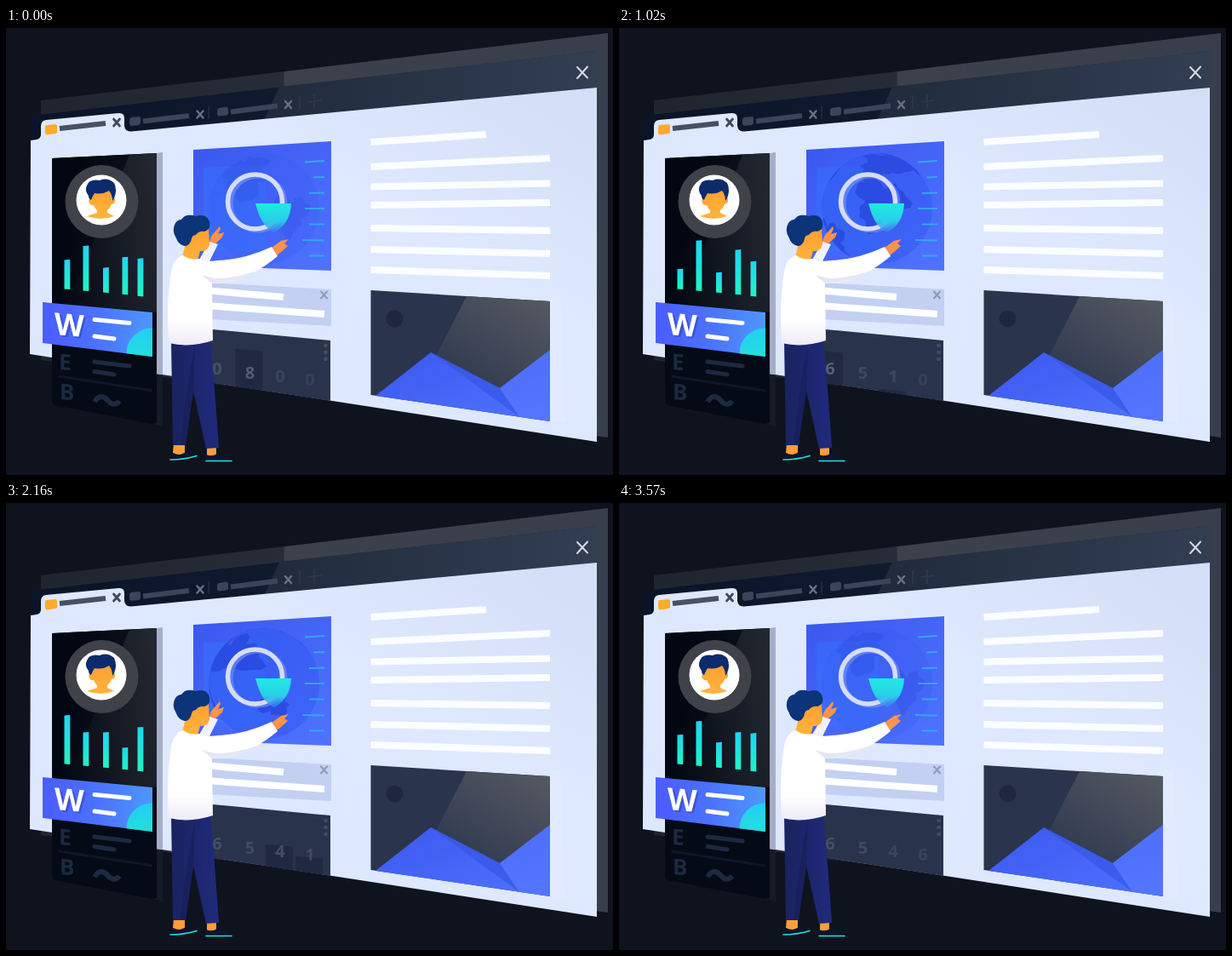
Write an HTML page that moves like this. It is 713 px wide and 525 px high and loops after 3600 ms.

```html
<!DOCTYPE html>
<html lang="en">
<head>
<meta charset="utf-8">
<title>Dashboard</title>
<style>
html, body { margin: 0; width: 100%; height: 100%; overflow: hidden; background: #0f131e; }
svg { display: block; width: 713px; height: 525px; }
text { font-family: "Open Sans", "Noto Sans", sans-serif; font-weight: 700; }
.line { fill: none; stroke-linecap: round; }
</style>
</head>
<body>
<svg viewBox="0 0 713 525">
  <defs>
    <linearGradient id="rear"><stop offset="0" stop-color="#20242e"/><stop offset=".428" stop-color="#282c38"/><stop offset=".43" stop-color="#3d414c"/><stop offset="1" stop-color="#393e4c"/></linearGradient>
    <linearGradient id="head"><stop offset="0" stop-color="#0b1328"/><stop offset="1" stop-color="#172137"/></linearGradient>
    <linearGradient id="headShine"><stop offset="0" stop-color="#202a3c"/><stop offset="1" stop-color="#333e53"/></linearGradient>
    <linearGradient id="page" x1="0" y1="1" x2="1" y2="0"><stop offset="0" stop-color="#dde8ff"/><stop offset=".65" stop-color="#dee8ff"/><stop offset="1" stop-color="#d3def6"/></linearGradient>
    <linearGradient id="side" x2="1" y2=".3"><stop offset=".3" stop-color="#020712"/><stop offset="1" stop-color="#10151f"/></linearGradient>
    <linearGradient id="sheen" x1="1" x2="0" y2="1"><stop offset="0" stop-color="#fff" stop-opacity=".09"/><stop offset="1" stop-color="#fff" stop-opacity="0"/></linearGradient>
    <linearGradient id="blue" x2="1" y2="1"><stop offset="0" stop-color="#3a57ee"/><stop offset="1" stop-color="#5073ff"/></linearGradient>
    <linearGradient id="word"><stop offset="0" stop-color="#4b5cff"/><stop offset=".5" stop-color="#4b72ff"/><stop offset="1" stop-color="#4e97fb"/></linearGradient>
    <linearGradient id="teal" x2="0" y2="1"><stop offset="0" stop-color="#20d4f4"/><stop offset="1" stop-color="#1ff5c4"/></linearGradient>
    <linearGradient id="cup" x2="0" y2="1"><stop offset="0" stop-color="#20eae2"/><stop offset=".6" stop-color="#28cfe8"/><stop offset="1" stop-color="#3b86f2" stop-opacity=".6"/></linearGradient>
    <linearGradient id="glare" x1="1" x2=".2" y2="1"><stop offset="0" stop-color="#575a62"/><stop offset="1" stop-color="#2e384f"/></linearGradient>
    <linearGradient id="skin" x2="0" y2="1"><stop offset="0" stop-color="#ff9f32"/><stop offset="1" stop-color="#ffb43c"/></linearGradient>
    <linearGradient id="shirt" x2="0" y2="1"><stop offset=".75" stop-color="#fff"/><stop offset="1" stop-color="#eeeaf8"/></linearGradient>
    <linearGradient id="leg"><stop offset="0" stop-color="#1a235f"/><stop offset="1" stop-color="#1f2a7c"/></linearGradient>
    <clipPath id="wordClip"><path d="M43 322 172 334V386L43 370Z"/></clipPath>
    <clipPath id="panelClip"><path d="M200 350 381 367V438L200 410Z"/></clipPath>
    <path id="cross" class="line" d="M-3.5-4 3.5 4M3.5-4-3.5 4"/>
  </defs>

  <path d="M41 85 707 6V481L41 390Z" fill="url(#rear)"/>
  <path d="M29 103 694 27V486L28 383Z" fill="url(#head)"/>
  <path d="M321 69 694 27V71L303 109Z" fill="url(#headShine)"/>
  <path d="M29 132 36 131Q41 130 41 125V115Q41 109 47 108L132 100Q139 99 139 106V115Q140 122 147 121.500L694 70V486L28 383Z" fill="url(#page)"/>

  <!-- tabs -->
  <path d="M48 114 58 113Q60 113 60 115V122Q60 124 58 124L48 125.500Q46 125 46 123V116Q46 114 48 114Z" fill="#ffab2b"/>
  <path d="M63 118 117 112" stroke="#485064" stroke-width="6"/>
  <use href="#cross" x="130" y="111" stroke="#3f475a" stroke-width="2.700"/>
  <g stroke="#3b4558" fill="#3b4558">
    <path d="M147 105 156 104Q158 104 158 106V112L156 114 147 115 145 113V107ZM250 94 259 92.500 261 94V101L259 102.500 250 103.500 248 102V96Z" stroke="none"/>
    <path d="M161 109.500 215 103M264 98.500 319 91.500" stroke-width="6"/>
    <path d="M238 92V107M345 79V95M354 87 371 85M362 78V95" stroke-width="1.500" opacity=".5"/>
  </g>
  <g stroke="#687184" stroke-width="2.500"><use href="#cross" x="228" y="101.500"/><use href="#cross" x="331.500" y="90"/></g>
  <path class="line" d="M671 46 683 58.500M683 45.500 671 59" stroke="#d6dbe3" stroke-width="2"/>

  <!-- profile column -->
  <path d="M177 147 184 146V407.500L177 406.500Z" fill="#a5aec8"/>
  <path d="M172 406 184 407.500V468L172 465Z" fill="#161b27"/>
  <path d="M54 153 177 147V464L172 465 57 443 54 440Z" fill="#040a16"/>
  <path d="M54 153 177 147V334L54 323Z" fill="url(#side)"/>
  <path d="M145 149 177 147V334L72 325Z" fill="url(#sheen)"/>
  <circle cx="112.500" cy="204" r="43" fill="#404249"/>
  <circle cx="112" cy="202" r="29.500" fill="#fff"/>
  <path d="M101 192 99 200Q96 201 98 206 100 209 103 208 105 213 107 214V217L95 221Q111 227 127 221L119 217V214Q123 211 124 207 129 206 128 201L122 188Z" fill="url(#skin)"/>
  <path d="M100 202Q97 201 97 197 92 191 95 185 98 177 110 179 119 175 127 182 131 190 127 200L125 203Q125 196 121 191 113 196 104 194 102 197 100 202Z" fill="#0b2b6d"/>
  <circle id="flash" cx="112.500" cy="204" r="43" fill="#fff"/>
  <g id="bars" fill="url(#teal)"></g>

  <path d="M43 322 172 334V386L43 370Z" fill="url(#word)"/>
  <circle cx="171" cy="382" r="29.500" fill="url(#teal)" opacity=".9" clip-path="url(#wordClip)"/>
  <text transform="translate(60 362) skewY(5)" font-size="35" fill="#17236f" opacity=".3">W</text>
  <text transform="translate(57 360) skewY(5)" font-size="36" fill="#fff">W</text>
  <path class="line" d="M104 342.500 145 346.500M104 362 127 365" stroke="#fff" stroke-width="5"/>
  <g fill="#1c2941" stroke="#1c2941">
    <text transform="translate(62 401) skewY(5)" font-size="26" stroke="none">E</text>
    <text transform="translate(63 436) skewY(5)" font-size="26" stroke="none">B</text>
    <path class="line" d="M104 392 145 397M104 403.500 127 407" stroke-width="5"/>
    <path d="M104 439Q111 428 119 437T133 438" fill="none" stroke-width="6"/>
    <path d="M62 409 172 426" stroke="#0d1728" stroke-width="3"/>
  </g>

  <!-- globe card -->
  <path d="M220 143 382 133V285L220 279Z" fill="url(#blue)"/>
  <path d="M232 164 305 160V263L232 262Z" fill="#3279ff" opacity=".4"/>
  <g id="globe">
    <circle cx="303" cy="212" r="65" fill="#3159f4" opacity=".5"/>
    <path id="land" fill="#2643da" opacity=".7"/>
  </g>
  <path d="M351 157.500 374 156M361.500 175.500 374 175M356 194 374 193.500M351 212H374M356 230.500H374M348 249 374 249.500M356 267.500H374" stroke="#2bb9ee" stroke-width="2" opacity=".8"/>
  <circle cx="296" cy="206" r="32" fill="none" stroke="#7d95f3" stroke-width="5" opacity=".6"/>
  <circle cx="292.500" cy="204" r="32" fill="none" stroke="#d5dcf5" stroke-width="5.500"/>
  <path d="M293 206H335Q334 230 315 240 300 234 293 206Z" fill="url(#cup)"/>

  <!-- note card -->
  <path d="M220 298 382 307V350L220 341Z" fill="#c3d0f1"/>
  <path d="M220 307 326 316M220 325 374 336" stroke="#fff" stroke-width="8"/>
  <use href="#cross" x="373.500" y="313.500" stroke="#8c9aba" stroke-width="2"/>

  <!-- counter card -->
  <path d="M200 350 381 367V438L200 410Z" fill="#29334b"/>
  <g id="wells" fill="#202940" clip-path="url(#panelClip)"></g>
  <g id="digits" fill="#586278" font-size="20" text-anchor="middle"></g>
  <g fill="#434d65"><circle cx="375.500" cy="373" r="2.300"/><circle cx="375.500" cy="381" r="2.300"/><circle cx="375.500" cy="389" r="2.300"/></g>

  <!-- article -->
  <path d="M428.500 134 564 125M428.500 163 639 153M428.500 186.500 639 182.500M428.500 208 639 205M428.500 235 639 238M428.500 260 639 265M428.500 284 639 291" stroke="#fff" stroke-width="8.200" opacity=".93"/>
  <path d="M639 315 651 314 657 463 639 462Z" fill="#e5edff" opacity=".6"/>
  <path d="M428.500 308 639 321V462L428.500 431Z" fill="#2a344c"/>
  <path d="M541 315 639 321V424L580 423 505 385Z" fill="url(#glare)"/>
  <circle cx="456.500" cy="341.500" r="10" fill="#1e273c"/>
  <path d="M434 432 499 381 580 423 639 378V462Z" fill="url(#blue)"/>
  <path d="M499 381 580 423 603 457Z" fill="#3455e5" opacity=".65"/>
  <path d="M580 423 639 378V462L603 457Z" fill="#5879ff" opacity=".55"/>

  <!-- person -->
  <path d="M239 252Q240 244 245 240L251 233 252 236 249 242 256 240 254 246 246 253Z" fill="#ff934a"/>
  <path d="M227 272 239 251 249 254 239 274Z" fill="#f2f2fb"/>
  <path d="M312 258 323 250 332 248 327 253 331 256 322 264 317 268Z" fill="#ff934a"/>
  <path d="M197 488H210L210 499 200 503 196 499ZM236 493H247V503H236Z" fill="#ff9d3a"/>
  <path d="M194 367H240Q246 430 250 493L235 494 220 426 211 490H196Z" fill="url(#leg)"/>
  <path d="M222 372 220 426 211 490H205Q211 425 222 372Z" fill="#141c52" opacity=".5"/>
  <path d="M196 499Q204 503 210 499L224 502 194 506ZM235 501Q242 504 248 500L264 507H235Z" fill="#0b1434"/>
  <path class="line" d="M193 507Q209 507 224 502.500M235 508.500H265" stroke="#20e5d5" stroke-width="1.600"/>
  <path d="M211 253 219 240 238 236 239 254Q237 263 228 262L225 273Q215 277 207 269Z" fill="url(#skin)"/>
  <path d="M208 267Q197 270 194 286 188 322 191 370 216 376 243 367L242 300Q281 300 319 268L312 257Q280 272 249 273 236 275 227 271 216 273 208 267Z" fill="url(#shirt)"/>
  <path d="M230 290 242 300Q271 299 296 285 265 295 245 294Z" fill="#e6e6f5"/>
  <path d="M210 256Q202 254 200 247 194 238 199 229 202 225 206 225 211 217 223 221 236 217 239 228 241 237 233 239 227 238 223 243 218 243 218 249 214 257 210 256Z" fill="#0b3479"/>
  <path d="M218 247Q224 242 225 249 222 254 217 252Z" fill="#ffa435"/>
</svg>
<script>
const LOOP = 3600, HALF = LOOP / 2;
const $ = id => document.getElementById(id);
const clamp = (n, lo, hi) => Math.max(lo, Math.min(hi, n));
const smooth = u => u * u * (3 - 2 * u);
const bump = (t, peak, width) => clamp(1 - Math.abs(t - peak) / width, 0, 1);

function add(parent, tag) {
  return $(parent).appendChild(document.createElementNS("http://www.w3.org/2000/svg", tag));
}

// Each bar swings one way, back the other, then rebounds, twice per loop
const bars = [
  { x: 68.5, mid: 266, swing: -17, rebound: -.2 },
  { x: 90.5, mid: 259, swing: 10, rebound: 1.9 },
  { x: 114, mid: 278, swing: -9, rebound: .7 },
  { x: 136.5, mid: 273.5, swing: 13.5, rebound: .35 },
  { x: 154.5, mid: 268.5, swing: -5.5, rebound: 1.35 }
];
for (const b of bars) b.el = add("bars", "path");

function bounce(u, rebound) {
  const at = [0, .2, .55, .82, 1], level = [-.35, 1, -1, rebound, -.35];
  const i = at.findIndex(a => a > u);
  return level[i - 1] + (level[i] - level[i - 1]) * smooth((u - at[i - 1]) / (at[i] - at[i - 1]));
}

// The wells light up one after the other while the digits count
const TURN = 900, STEP = 130;
const cols = [
  { x: 248, turn: 1, start: 0, from: 0, to: 6 },
  { x: 286.5, turn: 0, start: 0, from: 8, to: 5 },
  { x: 322, turn: 2, start: 880, from: 0, to: 4 },
  { x: 357, turn: 3, start: 2000, from: 0, to: 6 }
];
for (const c of cols) {
  c.y = 407 + (c.x - 248) * .12;
  c.well = add("wells", "path");
  c.text = add("digits", "text");
  c.text.setAttribute("x", c.x);
  c.text.setAttribute("y", c.y);
}

function digit(c, t) {
  const n = clamp(Math.floor((t - c.start) / STEP), 0, Math.abs(c.to - c.from));
  return c.from + n * Math.sign(c.to - c.from);
}

// Continents: ragged blobs at [longitude, latitude, size] in degrees
const lands = [[-100, 48, 27], [-60, -15, 21], [20, 5, 26], [50, 52, 24], [100, 45, 27], [135, -25, 15]];

function project(lon, lat) {
  const rad = Math.PI / 180, flat = Math.cos(lat * rad);
  let x = flat * Math.sin(lon * rad), y = -Math.sin(lat * rad);
  const front = flat * Math.cos(lon * rad) > 0;
  const k = front ? 65 : 65 / (Math.hypot(x, y) || 1); // hidden points slide along the rim
  return { front, x: 303 + k * (x * .95 + y * .3), y: 212 + k * (y * .95 - x * .3) };
}

function landPath(lon0) {
  return lands.map(([lon, lat, size], n) => {
    const pts = [];
    for (let a = 0; a < 2 * Math.PI; a += .13) {
      const r = size * (1 + .25 * Math.sin(3 * a + n) + .14 * Math.sin(7 * a + 2 * n) + .08 * Math.sin(13 * a));
      const la = lat + r * Math.sin(a);
      pts.push(project(lon + r * Math.cos(a) / Math.cos(lat * Math.PI / 180) - lon0, la));
    }
    if (!pts.some(p => p.front)) return "";
    return "M" + pts.map(p => p.x.toFixed(1) + " " + p.y.toFixed(1)).join("L") + "Z";
  }).join("");
}

function draw(t) {
  bars.forEach((b, i) => {
    const y = b.mid + b.swing * bounce(t % HALF / HALF, b.rebound);
    b.el.setAttribute("d", `M${b.x} ${y + .5}l6.8-.6V${307 + i * 2.1}l-6.8-.6Z`);
  });
  cols.forEach((c, i) => {
    const lit = bump(t, c.turn * TURN, 1000);
    c.well.setAttribute("d", `M${c.x - 17} ${c.y + 20 - 55 * lit}l32 3V445h-32Z`);
    c.text.textContent = digit(c, t);
    c.text.setAttribute("opacity", .6 - .1 * i + .4 * lit);
  });
  $("flash").setAttribute("opacity", .17 * smooth(bump(t, 330, 330)));
  $("globe").setAttribute("opacity", .4 + .6 * clamp(Math.min(t, LOOP - t) / 300, 0, 1));
  $("land").setAttribute("d", landPath(60 + (t - 1470) / 10));
}

function frame() {
  draw(Math.floor(performance.now() % LOOP / 30) * 30);
  requestAnimationFrame(frame);
}
frame();
</script>
</body>
</html>
```
